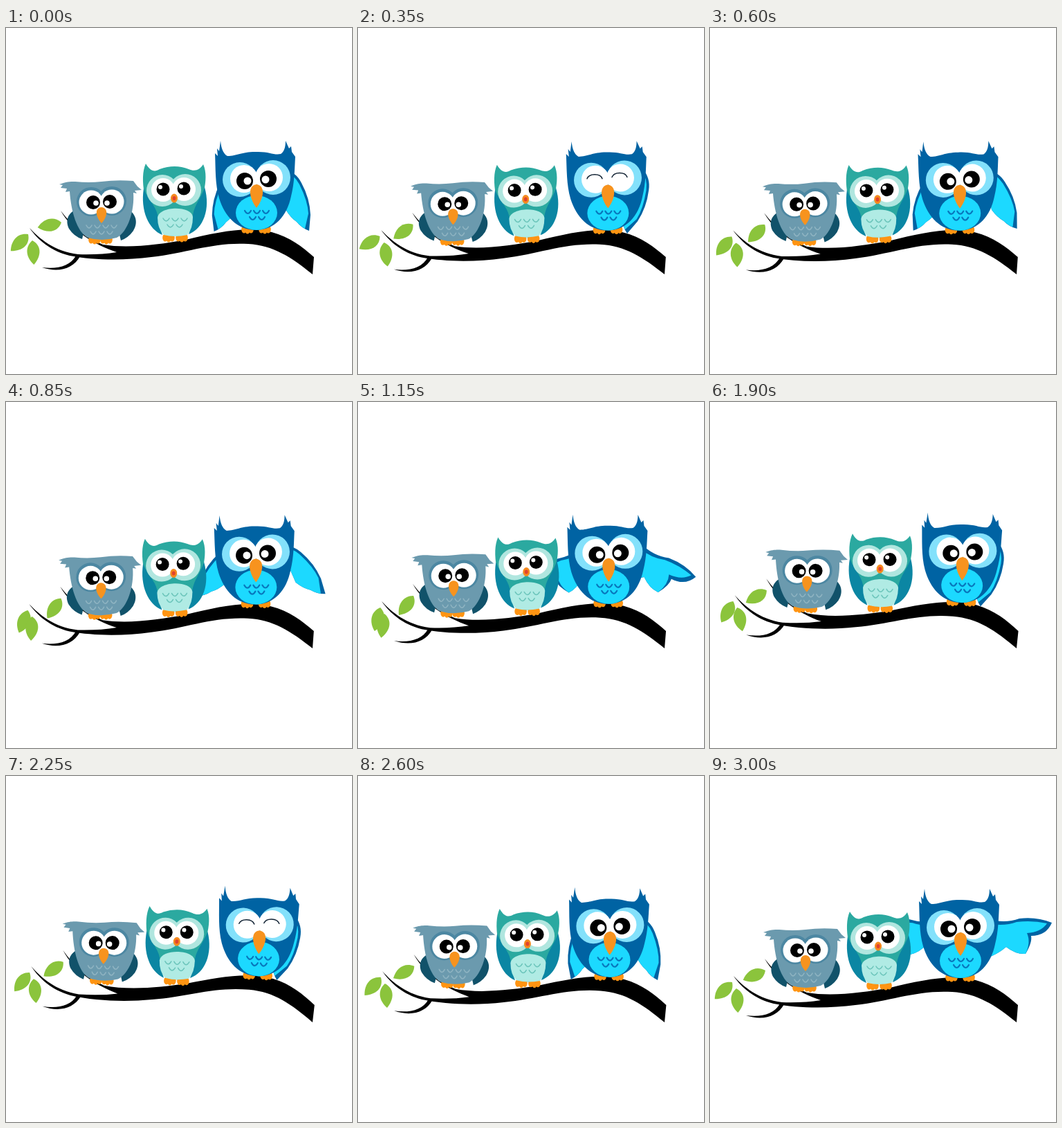
These frames come from a looping animation (500x500 px, 3050 ms). An HTML page:

```html
<!DOCTYPE html>
<html lang="en">
<head>
<meta charset="utf-8">
<title>Owls on a branch</title>
<style>
html, body { margin: 0; width: 100%; height: 100%; overflow: hidden; background: #fff; }
svg { display: block; width: 100%; height: 100%; }
.line { fill: none; stroke-width: 1.5; stroke-linecap: round; }
</style>
</head>
<body>
<svg viewBox="0 0 500 500">
  <defs>
    <path id="leaf" d="M0 0C8 -13 23 -12 35 0C24 11 9 12 0 0Z" fill="#8bc43c"/>
    <g id="foot" fill="#ff9412">
      <ellipse cx="-5" rx="3.8" ry="5.5"/><ellipse cy="1" rx="3.6" ry="5.5"/><ellipse cx="5" rx="3.8" ry="5.5"/>
    </g>
    <g id="raised">
      <path fill="#0063a3" d="M400 206Q425 214 447 206Q472 203 494 212Q486 231 464 231Q466 240 456 257Q442 258 428 247Q415 258 402 262Z"/>
      <path fill="#1cd9ff" d="M400 213Q425 218 443 211Q465 208 487 213Q478 226 458 227Q464 240 456 257Q442 258 428 247Q415 258 402 262Z"/>
    </g>
    <g id="lowered">
      <path fill="#0063a3" d="M402 204Q419 208 427 224Q439 246 440 270L438 293Q427 289 420 280Q411 274 404 262Z"/>
      <path fill="#1cd9ff" d="M402 207Q416 211 424 226Q436 250 437 268L432 290Q426 287 420 280Q411 274 404 262Z"/>
    </g>
  </defs>
  <g id="scene">
    <!-- branch -->
    <path d="M34 289C48 304 70 323 104 327Q135 328 160 324C128 313 96 294 79 264C96 287 118 304 140 313C176 319 222 313 260 306C306 295 348 286 384 295C410 302 428 316 445 331L443 356C412 331 386 314 350 312C300 309 262 325 210 331C172 336 128 336 92 329C64 322 46 306 34 289Z"/>
    <path d="M52 346C74 349 93 344 101 329L107 330C97 348 76 354 52 346Z"/>
    <use class="leaf" href="#leaf"/><use class="leaf" href="#leaf"/><use class="leaf" href="#leaf"/>

    <!-- large owl -->
    <use id="wingL"/><use id="wingR"/>
    <use href="#foot" x="349" y="291"/><use href="#foot" x="374" y="291"/>
    <path fill="#0063a3" d="M310 163C311 174 314 182 320 185C334 185 340 179 360 179C380 178 386 184 397 182C402 179 404 172 404 163L409 174L412 171L413 179L418 186C417 204 417 224 412 243C406 272 388 292 361 292C334 292 316 272 308 246C302 225 303 203 302 181L306 185L305 174L308 178Z"/>
    <ellipse cx="362" cy="267" rx="30" ry="25" fill="#1cd9ff"/>
    <g fill="#83e1fb"><circle cx="338" cy="219" r="25"/><circle cx="386" cy="216" r="25"/></g>
    <g fill="#fff"><circle cx="344" cy="218" r="20"/><circle cx="380" cy="216" r="20"/></g>
    <g id="open">
      <circle cx="345" cy="221" r="12"/><circle cx="379" cy="218" r="12"/>
      <g fill="#fff"><circle cx="349" cy="221" r="5.5"/><circle cx="375" cy="219" r="5.5"/></g>
    </g>
    <path id="shut" class="line" stroke="#123" d="M332 217C335 209 351 209 354 217M368 215C371 207 387 207 390 215"/>
    <path fill="#f7931e" d="M362 226C376 228 372 247 362 260C352 247 348 228 362 226Z"/>
    <path class="scales line" stroke="#0878bd" style="stroke-width:2.2" data-rows="343 264 3 13, 350 273 2 13"/>

    <!-- middle owl -->
    <use href="#foot" x="235" y="303"/><use href="#foot" x="254" y="303"/>
    <path fill="#2ba9a0" d="M202 196C208 206 214 209 222 204Q244 196 264 204C273 208 280 205 285 197C290 208 289 222 286 236C288 268 272 300 245 301C220 301 206 274 200 240C197 222 197 207 202 196Z"/>
    <path fill="#0b86a3" d="M199 232C205 248 216 256 219 270Q221 286 226 299C206 291 194 264 199 232ZM287 230C282 246 273 254 270 270Q268 286 264 298C285 290 296 262 287 230Z"/>
    <path fill="#b0ebe4" d="M219 274C221 257 268 256 270 273Q270 290 262 299Q244 303 228 299Q219 290 219 274Z"/>
    <g fill="#b0e6df"><circle cx="226" cy="235" r="23"/><circle cx="259" cy="234" r="23"/></g>
    <g fill="#fff"><circle cx="227" cy="234" r="17"/><circle cx="257" cy="233" r="17"/></g>
    <circle cx="227" cy="233" r="9.5"/><circle cx="257" cy="232" r="9.5"/>
    <g fill="#fff"><circle cx="223" cy="230" r="3"/><circle cx="253" cy="229" r="3"/></g>
    <ellipse cx="243" cy="246" rx="5" ry="6.5" fill="#f58a1f"/>
    <ellipse cx="243" cy="246" rx="2.5" ry="3" fill="#e0432f"/>
    <path class="scales line" stroke="#6cc5bb" data-rows="225 275 3 13, 231 284 2 13"/>

    <!-- small owl -->
    <use href="#foot" x="128" y="306"/><use href="#foot" x="145" y="306"/>
    <path fill="#11526a" d="M101 262C88 269 86 279 91 290Q98 301 110 305L116 280ZM177 262C190 271 190 283 184 293Q177 303 166 307L160 282Z"/>
    <path fill="#6b9aae" d="M77 226C87 222 92 222 100 222Q120 224 138 222Q160 219 184 221L190 229L196 234L186 235L189 239L184 238C186 264 176 295 160 303Q138 309 118 303C102 294 94 264 92 236L86 237L88 232L79 231L82 227Z"/>
    <g fill="#4c87a2"><circle cx="123" cy="251" r="21"/><circle cx="153" cy="250" r="21"/></g>
    <g fill="#fff"><circle cx="123" cy="252" r="17.5"/><circle cx="153" cy="251" r="17.5"/></g>
    <circle cx="126" cy="252" r="10"/><circle cx="150" cy="251" r="10"/>
    <g fill="#fff"><circle cx="130" cy="253" r="3.8"/><circle cx="146" cy="253" r="3.8"/></g>
    <path fill="#f7931e" d="M138 259C149 260 146 274 138 282C130 274 127 260 138 259Z"/>
    <path class="scales line" stroke="#8fb4c2" data-rows="114 285 4 12, 120 294 3 12"/>
  </g>
</svg>
<script>
const LOOP = 3050, STEP = 50, FLAP = 310;
const $ = id => document.getElementById(id);
const leaves = document.querySelectorAll('.leaf');

// piecewise linear value at time t
function at(times, values, t) {
  let i = 1;
  while (i < times.length - 1 && t > times[i]) i++;
  const k = (t - times[i - 1]) / (times[i] - times[i - 1]);
  return values[i - 1] + (values[i] - values[i - 1]) * k;
}

// rows of small feather arcs: x y count width
for (const path of document.querySelectorAll('.scales')) {
  let d = '';
  for (const row of path.dataset.rows.split(',')) {
    const [x, y, n, w] = row.trim().split(' ').map(Number);
    for (let i = 0; i < n; i++) d += `M${x + i * w + 2} ${y}q${w / 2 - 2} 8 ${w - 4} 0`;
  }
  path.setAttribute('d', d);
}

const poses = [0, 350, 850, 1450, 1900, 2250, 3000, LOOP];
const leafPoses = [
  { x: 32, y: 298, turn: [136, 149, 112, 95, 118, 127, 136, 136] },
  { x: 38, y: 307, turn: [86, 82, 93, 102, 76, 82, 86, 86] },
  { x: 80, y: 281, turn: [168, 144, 125, 129, 148, 142, 157, 163] }
];
const swayTimes = [0, 350, 600, 850, 1450, 1900, 2250, 2350, 2750, 3000, LOOP];
const sway = [0, -0.42, -0.5, -0.42, 0.7, 1.4, 1.95, 1.95, 0.4, 0, 0];

// wing angle: 0 is fully raised, REST hangs beside the body
const REST = 76;
const flapTimes = [0, 40, 85, 210, 230, 270, FLAP];
const flap = [REST, 112, 112, 0, 55, 66, REST];

const set = (el, transform) => el.setAttribute('transform', transform);

function poseWing(el, angle, mirror = '') {
  const up = angle < 30;
  el.setAttribute('href', up ? '#raised' : '#lowered');
  set(el, `${mirror} rotate(${up ? angle : angle - REST} 408 220)`);
}

function draw(t) {
  set($('scene'), `rotate(${at(swayTimes, sway, t)} 443 355)`);

  leafPoses.forEach((leaf, i) =>
    set(leaves[i], `translate(${leaf.x} ${leaf.y}) rotate(${at(poses, leaf.turn, t)})`));

  const angle = at(flapTimes, flap, t % FLAP);
  poseWing($('wingR'), angle);
  poseWing($('wingL'), angle + 2, 'translate(736 0) scale(-1 1)');

  const blink = [350, 2250].some(b => Math.abs(t - b) <= 100);
  $('open').style.display = blink ? 'none' : '';
  $('shut').style.display = blink ? '' : 'none';
}

const start = performance.now();
function tick() {
  const t = (performance.now() - start) % LOOP;
  draw(Math.floor(t / STEP) * STEP);
  requestAnimationFrame(tick);
}
tick();
</script>
</body>
</html>
```
